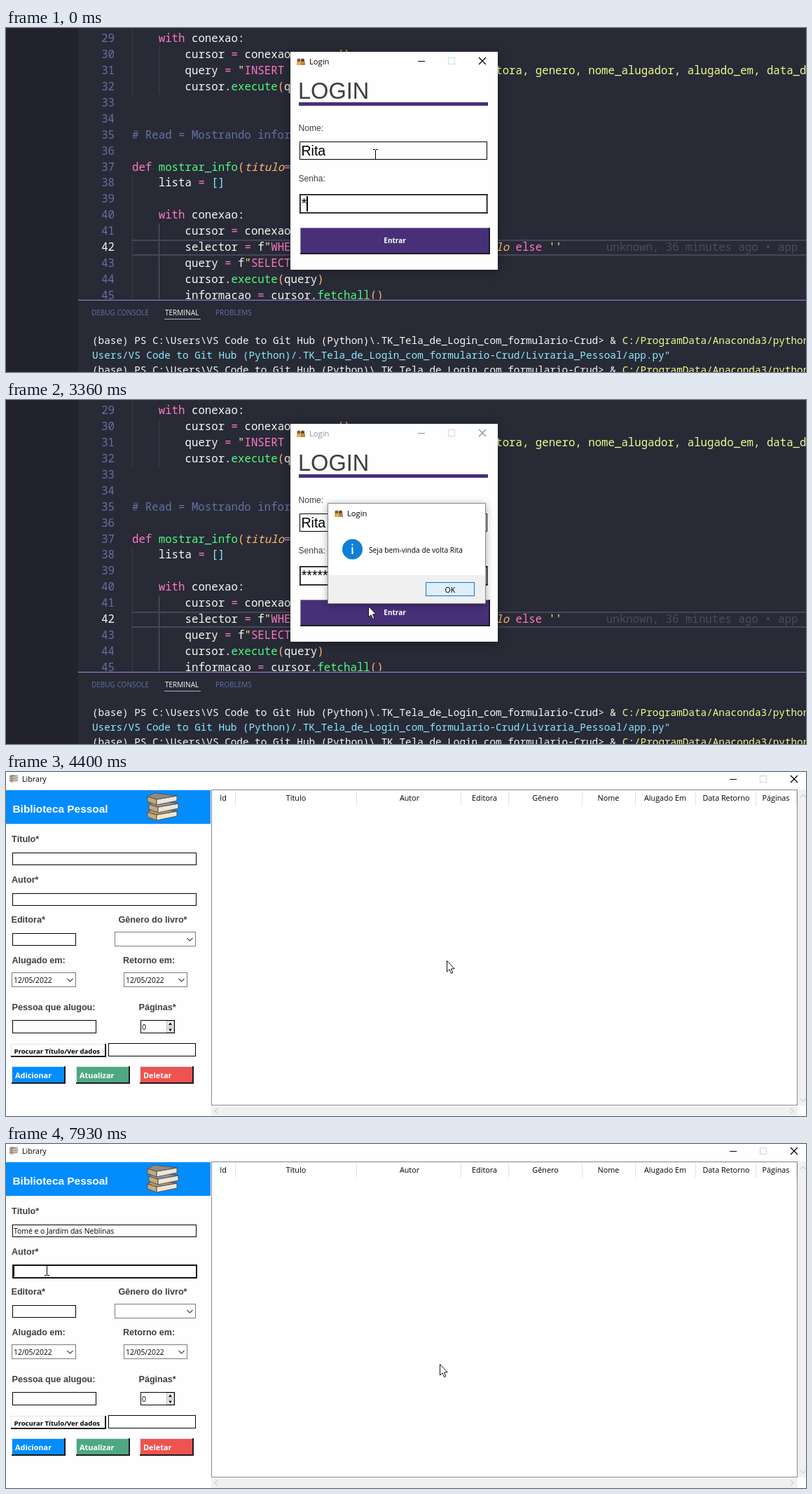
Write an HTML page with a canvas that moves like this. It is 1142 by 491 pixels and loops after 8000 ms.

```html
<!DOCTYPE html>
<html lang="pt">
<head>
<meta charset="utf-8">
<title>Login</title>
<style>
html, body { margin: 0; width: 100%; height: 100%; overflow: hidden; background: #282a36; }
canvas { display: block; }
</style>
</head>
<body>
<canvas id="stage" width="1142" height="491"></canvas>
<script>
const ctx = document.getElementById('stage').getContext('2d');
const LOOP = 8000;
const NAME = 'Rita', BOOK = 'Tomé e o Jardim das Neblinas';
const MONO = '"Noto Sans Mono", monospace';
const UI = '"Open Sans", sans-serif';
const ARIAL = '"Liberation Sans", Arial, sans-serif';
const INK = '#403d3d', PURPLE = '#483078', BLUE = '#038cfc';
const TONES = { W: '#f8f8f2', P: '#ff79c6', G: '#50fa7b', Y: '#f1fa8c', O: '#ffb86c',
                I: '#ffb86c', C: '#8be9fd', B: '#6272a4', D: '#4b4d5d' };

function rect(x, y, w, h, color) {
  ctx.fillStyle = color;
  ctx.fillRect(x, y, w, h);
}

function frame(x, y, w, h, color, line = 1) {
  rect(x, y, w, line, color);
  rect(x, y + h - line, w, line, color);
  rect(x, y, line, h, color);
  rect(x + w - line, y, line, h, color);
}

function text(s, x, y, font, color = '#000', align = 'left') {
  ctx.font = font;
  ctx.textAlign = align;
  ctx.fillStyle = color;
  ctx.fillText(s, x, y);
}

function path(points, color, width = 1) {
  ctx.beginPath();
  points.forEach(([x, y]) => ctx.lineTo(x, y));
  ctx.strokeStyle = color;
  ctx.lineWidth = width;
  ctx.stroke();
}

function poly(points, fill, stroke) {
  ctx.beginPath();
  points.forEach(([x, y]) => ctx.lineTo(x, y));
  ctx.closePath();
  ctx.fillStyle = fill;
  ctx.fill();
  if (stroke) {
    ctx.strokeStyle = stroke;
    ctx.lineWidth = 1;
    ctx.stroke();
  }
}

function disc(x, y, r, color) {
  ctx.beginPath();
  ctx.arc(x, y, r, 0, Math.PI * 2);
  ctx.fillStyle = color;
  ctx.fill();
}

// Shadow outside the box only, so a translucent box stays clean
function shadow(x, y, w, h, blur) {
  ctx.save();
  ctx.beginPath();
  ctx.rect(0, 0, 1142, 491);
  ctx.rect(x, y, w, h);
  ctx.clip('evenodd');
  ctx.shadowColor = 'rgba(0,0,0,.35)';
  ctx.shadowBlur = blur;
  ctx.shadowOffsetY = 2;
  rect(x, y, w, h, '#000');
  ctx.restore();
}

const clamp = k => Math.min(1, Math.max(0, k));
const smooth = k => k * k * (3 - 2 * k);

// Position along timed points [time, x, y], eased between each pair
function along(keys, t) {
  let i = 0;
  while (i < keys.length - 2 && t >= keys[i + 1][0]) i++;
  const [t0, x0, y0] = keys[i], [t1, x1, y1] = keys[i + 1];
  const e = smooth(clamp((t - t0) / (t1 - t0)));
  return [Math.round(x0 + (x1 - x0) * e), Math.round(y0 + (y1 - y0) * e)];
}

// ---- editor ----
const CELL = 9.44;
const CODE = '500 15.73px ' + MONO;
const rowY = n => 20 + (n - 29) * 22.94;

// Each part starts with its tone letter
function code(n, col, ...parts) {
  for (const part of parts) {
    const s = part.slice(1), slant = part[0] === 'I' ? 'italic ' : '';
    text(s, 180 + col * CELL, rowY(n), slant + CODE, TONES[part[0]]);
    col += s.length;
  }
}

function terminal(y, ...parts) {
  let x = 123;
  for (const part of parts) {
    text(part.slice(1), x, y, '500 14.33px ' + MONO, TONES[part[0]]);
    x += (part.length - 1) * 8.6;
  }
}

function editor() {
  rect(0, 0, 1142, 491, '#282a36');
  rect(0, 0, 103, 491, '#22232d');
  const guide = '#3c3e4c';
  rect(180, 0, 1, 95, guide);
  rect(218, 27, 1, 68, guide);
  rect(180, 210, 1, 177, guide);
  rect(218, 279, 1, 108, '#585a69');
  rect(180, 302, 962, 2, '#44475a');
  rect(180, 323, 962, 2, '#44475a');

  ctx.save();
  ctx.beginPath();
  ctx.rect(103, 0, 1039, 387);
  ctx.clip();
  for (let n = 29; n <= 45; n++)
    text(n, 155, rowY(n), CODE, n === 42 ? TONES.W : TONES.B, 'right');
  code(28, 0, 'Pdef ', 'Ginserir_info', 'O(', 'Ii', 'O)', 'W:');
  code(29, 4, 'Pwith ', 'Wconexao:');
  code(30, 8, 'Wcursor ', 'P= ', 'Wconexao.', 'Gcursor', 'O()');
  code(31, 8, 'Wquery ', 'P= ', 'Y"', 'PINSERT');
  code(31, 55, 'Ytora, genero, nome_alugador, alugado_em, data_devolucao');
  code(32, 8, 'Wcursor.', 'Gexecute', 'O(', 'Wquery');
  code(35, 0, 'B# Read = Mostrando informa');
  code(37, 0, 'Pdef ', 'Gmostrar_info', 'O(', 'Ititulo', 'P=');
  code(38, 4, 'Wlista ', 'P= ', 'C[]');
  code(40, 4, 'Pwith ', 'Wconexao:');
  code(41, 8, 'Wcursor ', 'P= ', 'Wconexao');
  code(42, 8, 'Wselector ', 'P= ', 'Wf', 'Y"', 'PWHERE');
  code(42, 55, 'Ilo', 'P else ', "Y''");
  code(42, 71.7, 'Dunknown, 36 minutes ago • app');
  code(43, 8, 'Wquery ', 'P= ', 'Wf', 'Y"', 'PSELECT');
  code(44, 8, 'Wcursor.', 'Gexecute', 'O(', 'Wquery', 'O)');
  code(45, 8, 'Winformacao ', 'P= ', 'Wcursor.', 'Gfetchall', 'O()');
  ctx.restore();

  rect(103, 388, 1039, 1, '#a583d8');
  text('DEBUG CONSOLE', 122, 410, '10px ' + UI, TONES.B);
  text('TERMINAL', 227, 410, '10px ' + UI, TONES.W);
  text('PROBLEMS', 299, 410, '10px ' + UI, TONES.B);
  rect(226, 415, 52, 1, '#b5abc0');
  const folder = '.TK_Tela_de_Login_com_formulario-Crud';
  const prompt = 'W(base) PS C:\\Users\\VS Code to Git Hub (Python)\\' + folder + '> & ';
  const exe = 'YC:/ProgramData/Anaconda3/python.exe';
  terminal(451, prompt, exe);
  terminal(472, 'CUsers/VS Code to Git Hub (Python)/' + folder + '/Livraria_Pessoal/app.py"');
  terminal(493, prompt, exe);
}

// ---- shared window parts ----
function people(x, y) {
  disc(x + 3, y + 3, 2.6, '#8a5a2b');
  disc(x + 8.5, y + 3, 2.6, '#6b4a2a');
  rect(x, y + 5, 6, 5, '#e0b04a');
  rect(x + 6, y + 5, 6, 5, '#b98a45');
}

function books(x, y, size) {
  ctx.save();
  ctx.translate(x, y);
  ctx.scale(size, size);
  const layers = [[23, '#b39a72', 0], [12, '#8c99a3', 2], [1, '#8f8c86', 0]];
  for (const [top, cover, dx] of layers) {
    poly([[1 + dx, top + 5], [14 + dx, top + 9], [14 + dx, top + 17], [1 + dx, top + 12]], '#c8a878', '#5a5148');
    poly([[14 + dx, top + 9], [43 + dx, top + 4], [43 + dx, top + 11], [14 + dx, top + 17]], '#ece6d8', '#5a5148');
    poly([[1 + dx, top + 5], [11 + dx, top], [43 + dx, top + 4], [14 + dx, top + 9]], cover, '#5a5148');
  }
  ctx.restore();
}

function controls(min, max, close, y, ink, faint) {
  rect(min, y, 10, 1, ink);
  frame(max, y - 5, 10, 10, faint);
  path([[close, y - 5], [close + 10, y + 5]], ink, 1.2);
  path([[close + 10, y - 5], [close, y + 5]], ink, 1.2);
}

function chevron(x, y, dx, dy, color) {
  const ax = dy ? 4 : 2, ay = dy ? 2 : 4;
  path(dy ? [[x - ax, y - ay * dy], [x, y + ay * dy], [x + ax, y - ay * dy]]
          : [[x - ax * dx, y - ay], [x + ax * dx, y], [x - ax * dx, y + ay]], color, 1.2);
}

function raised(x, y, w, h, fill, light) {
  rect(x, y, w, h, fill);
  rect(x, y, w, 1, light);
  rect(x, y, 1, h, light);
  rect(x, y + h - 2, w, 2, '#1c1c1c');
  rect(x + w - 2, y, 2, h, '#1c1c1c');
}

// ---- login ----
function starCount(t) {
  return 1 + [200, 990, 1120, 1190, 1320, 1390].filter(at => t >= at).length;
}

function passwordCaret(t) {
  const hidden = [[400, 660], [920, 990], [1390, 1590], [2190, 2490]];
  return !hidden.some(([a, b]) => t >= a && t < b);
}

function login(t) {
  shadow(406, 34, 296, 311, 14);
  rect(406, 34, 296, 311, '#fefefe');

  const renamed = t >= 4060, behind = t >= 3080 && !renamed;
  const ink = behind ? '#8d8d8d' : '#000';
  if (renamed) books(415, 42, 0.26);
  else people(415, 43);
  text(renamed ? 'Library' : 'Login', 433, 52, (renamed ? 10.7 : 11.2) + 'px ' + UI, ink);
  controls(588, 631, 675, 47, ink, t >= 3080 ? '#d8d4dc' : '#c2e6e2');

  text('LOGIN', 417, 101, '32.6px ' + ARIAL, INK);
  rect(418, 106, 270, 5, PURPLE);
  text('Nome:', 417.5, 147, '12.1px ' + ARIAL, INK);
  frame(419, 162, 268, 26, '#000');
  text(NAME, 421.5, 182, '19.5px ' + ARIAL);
  text('Senha:', 417.5, 219, '12.1px ' + ARIAL, INK);
  frame(419, 237, 268.5, 27.7, '#111', 1.7);
  const n = starCount(t);
  text('*'.repeat(n), 421.7, 257, '19.5px ' + ARIAL);
  if (passwordCaret(t)) rect(Math.round(421.2 + n * 7.59), 240, 2, 22, '#000');

  if (t >= 2730 && t < 3080) {
    rect(420, 286, 270, 36, '#f0f0f0');
    rect(420, 286, 270, 1.5, '#777');
    rect(420, 286, 1.5, 36, '#777');
    rect(420, 321, 270, 1, '#d4d4d4');
    rect(689, 286, 1, 36, '#d4d4d4');
    text('Entrar', 556, 308, 'bold 10px ' + UI, '#444', 'center');
  } else {
    raised(420, 285, 271, 38, PURPLE, '#8c7cae');
    text('Entrar', 555, 307, 'bold 10px ' + UI, '#fff', 'center');
  }
}

function dialog(t) {
  if (t < 3080 || t >= 4270) return;
  const tick = Math.floor(t / 70) * 70;
  const opening = clamp((tick - 3010) / 210);
  const closing = clamp((tick - 4060) / 210);
  const size = 1 - 0.045 * Math.max(closing, 1 - opening);
  ctx.save();
  ctx.globalAlpha = opening * (1 - smooth(closing));
  ctx.translate(572, 219);
  ctx.scale(size, size);
  ctx.translate(-572, -219);
  shadow(459, 147, 226, 144, 10);
  rect(459, 147, 226, 103, '#fff');
  rect(459, 250, 226, 41, '#f0f0f0');
  frame(459, 147, 226, 144, '#8a8a8a');
  people(469, 157);
  text('Login', 487, 166, '11.2px ' + UI);
  disc(494.5, 213, 14.5, '#0f80d7');
  rect(493.5, 210, 2, 10, '#fff');
  rect(493.5, 205.5, 2, 2, '#fff');
  text('Seja bem-vinda de volta ' + NAME, 518, 218, '10.2px ' + UI);
  rect(599, 260, 70, 20, '#e0eef9');
  frame(599, 260, 70, 20, '#0078d7');
  text('OK', 634, 275, '10.6px ' + UI, '#000', 'center');
  ctx.restore();
}

// ---- library ----
const LABEL = 'bold 12.6px ' + ARIAL, SMALL = '10.7px ' + UI;

function label(s, x, y) { text(s, x, y, LABEL, INK); }

function picker(x, y, w, h, value) {
  rect(x, y, w, h, '#fff');
  frame(x, y, w, h, '#7a7a7a');
  chevron(x + w - 8.5, y + h / 2 + 0.5, 0, 1, '#444');
  text(value, x + 3, y + 14.5, '10.3px ' + UI);
}

function entry(x, y, w, h, focused) {
  if (focused) frame(x, y - 1, w + 1, h + 2, '#111', 2);
  else frame(x, y, w, h, '#000');
}

function action(s, x, color) {
  raised(x, 420, 77, 25, color, '#d9e6ee');
  text(s, x + 5, 437, 'bold 10.9px ' + UI, '#fff');
}

function table() {
  rect(293, 25, 849, 466, '#fff');
  frame(293, 25, 837, 451, '#828790');
  const heads = [['Id', 310, 327], ['Título', 414, 500], ['Autor', 576, 649], ['Editora', 683, 717],
    ['Gênero', 770, 822], ['Nome', 860, 898], ['Alugado Em', 941, 984],
    ['Data Retorno', 1028, 1070], ['Páginas', 1099, 1128]];
  for (const [s, x, edge] of heads) {
    text(s, x, 41, '10.8px ' + UI, '#000', 'center');
    rect(edge, 27, 1, 21, '#e2e2e2');
  }
  rect(1130, 25, 12, 451, '#f0f0f0');
  rect(293, 477, 837, 14, '#f0f0f0');
  const pale = '#b4dfd2';
  chevron(1138, 34, 0, -1, pale);
  chevron(1138, 468, 0, 1, pale);
  chevron(300, 484, -1, 0, pale);
  chevron(1122, 484, 1, 0, pale);
}

function library(t) {
  const ready = t >= 4340;
  rect(0, 0, 1142, 491, '#fefefe');
  books(5, 4, 0.27);
  text('Library', 23, 14, SMALL);
  controls(1033, 1076, 1120, 10, '#000', '#d5d5d5');
  rect(0, 26, 292, 48, BLUE);
  text('Biblioteca Pessoal', 9.5, 58, 'bold 15.4px ' + ARIAL, '#fff');
  books(201, 29, 1);
  label('Título*', 8, 100);
  label('Autor*', 8, 158);
  label('Editora*', 7.5, 215);
  label('Gênero do livro*', 160.5, 215);
  picker(155, 228, 116, 21, '');
  label('Alugado em:', 8.5, 273);
  label('Pessoa que alugou:', 8.5, 340);
  if (!ready) {
    rect(0, 25, 293, 1, '#000');
    rect(0, 74, 293, 2, '#000');
    rect(292, 25, 1, 466, '#000');
    if (t < 4270) rect(855, 25, 287, 466, '#000');
    return;
  }

  label('Retorno em:', 167, 273);
  label('Páginas*', 189.5, 340);
  entry(9, 115, 263, 18, t >= 5380 && t < 7060);
  entry(9, 173, 263, 18, t >= 7060);
  entry(9, 230, 91, 18);
  picker(8, 286, 92, 21, '12/05/2022');
  picker(168, 286, 91, 21, '12/05/2022');
  entry(9, 354, 120, 19);
  entry(192, 354, 49, 19);
  text('0', 194, 368, SMALL);
  for (const y of [355, 364]) {
    rect(229, y, 11, 8, '#f0f0f0');
    frame(229, y, 11, 8, '#b5b5b5');
  }
  poly([[232, 361], [234.5, 357.5], [237, 361]], '#000');
  poly([[232, 366.5], [237, 366.5], [234.5, 370]], '#000');
  raised(7, 388, 136, 19, '#fff', '#e3e3e3');
  text('Procurar Título/Ver dados', 11.5, 401.5, 'bold 9.55px ' + UI);
  entry(146, 387, 125, 19);
  action('Adicionar', 8, BLUE);
  action('Atualizar', 100, '#4fa882');
  action('Deletar', 191, '#ef5350');
  table();

  const filled = t >= 6260;
  if (filled) text(BOOK, 11, 128, '10.4px ' + UI);
  if ((t >= 5380 && t < 5980) || (filled && t < 6860)) {
    ctx.font = '10.4px ' + UI;
    const end = filled ? ctx.measureText(BOOK).width : 0;
    rect(Math.round(10.5 + end), 117, 2, 14, '#000');
  }
  if (t >= 7060 && (t < 7660 || t >= 7930)) rect(10, 174, 2, 15, '#000');
}

// ---- pointer ----
const ROUTE = [[1990, 527, 180], [2700, 513, 295], [3300, 513, 295], [3850, 629, 269],
  [4610, 629, 269], [4900, 447, 150], [5050, 250, 74], [5240, 62, 122],
  [6290, 62, 122], [6720, 58, 180]];

function arrow(x, y) {
  const shape = [[0, 0], [0, 15.5], [3.6, 12.3], [6, 18], [8.4, 17], [6, 11.5], [10.6, 11.2]];
  poly(shape.map(([a, b]) => [x + a + 0.5, y + b + 0.5]), '#fff', '#111');
}

function beam(x, y) {
  rect(x, y - 6, 1, 13, '#000');
  for (const end of [y - 7, y + 7]) {
    rect(x - 3, end, 3, 1, '#000');
    rect(x + 1, end, 3, 1, '#000');
  }
}

function pointer(t) {
  const [x, y] = along(ROUTE, Math.floor(t / 70) * 70);
  const within = (a, b) => y >= a && y <= b;
  const typing = t < 3000 ? within(162, 188) || within(237, 265)
    : t > 4610 && x < 272 && (within(114, 133) || within(172, 191));
  (typing ? beam : arrow)(x, y);
  if (t >= 5520) arrow(619, 314);
  else if (t >= 5450) arrow(623, 316);
  else if (t >= 5380) arrow(626, 317);
  else if (t >= 5310) arrow(638, 323);
}

function draw(now) {
  const t = now % LOOP;
  if (t < 4200) {
    editor();
    login(t);
  } else {
    library(t);
  }
  dialog(t);
  pointer(t);
}

const start = performance.now();
function loop() {
  draw(performance.now() - start);
  requestAnimationFrame(loop);
}
loop();
</script>
</body>
</html>
```
